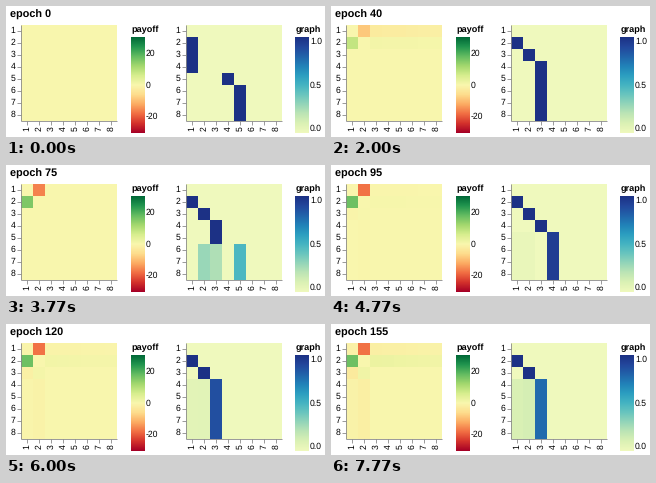
A matplotlib script that plays this animation: 319 px wide and 131 px high, repeating every 8 s.

```python
import numpy as np
import matplotlib.pyplot as plt
from matplotlib.animation import FuncAnimation
from matplotlib.colors import LinearSegmentedColormap

W, H, DPI = 319, 131, 100
FRAMES, STEP_MS, EPOCHS_PER_STEP = 32, 250, 5
N, CELL, TOP = 8, 12, 19
BOTTOM = TOP + N * CELL
BAR_TOP, BAR_HEIGHT, BAR_WIDTH = 31.5, 95.5, 13.3
GREY = "#888888"

plt.rcParams["font.family"] = "Liberation Sans"
plt.rcParams["text.hinting"] = "none"


def colormap(name, codes):
    return LinearSegmentedColormap.from_list(name, ["#" + c for c in codes.split()], N=512)


RED_GREEN = colormap("red_green", "a50026 d4322c f16e43 fcac63 fedd8d f9f7ae "
                                  "d7ee8e a4d86e 64bc61 22964f 006837")
GREEN_BLUE = colormap("green_blue", "eff9bd dbf1b4 bde5b5 94d5b9 69c5be "
                                    "45b4c2 2c9ec0 2182b8 2163aa 23479c 1c3185")


def ramp(epoch, start, end):
    return np.clip((epoch - start) / (end - start), 0, 1)


def pulse(epoch, center, width):
    return max(0, 1 - abs(epoch - center) / width)


def links(columns):
    """One row per player; a fractional column is shared by its two neighbours."""
    return np.maximum(0, 1 - abs(np.arange(1, N + 1) - columns[:, None]))


def stray(m, first_row, column, share):
    """Move a share of the weight in the rows from first_row on to one column."""
    m[first_row - 1:] *= 1 - share
    m[first_row - 1:, column - 1] += share


START = links(np.array([0, 1, 1, 1, 4, 5, 5, 5]))


def graph(epoch):
    # Each player links to the one before, up to a cap that drifts over time
    cap = np.interp(epoch, [10, 30, 40, 75, 85, 95, 115], [1.4, 2, 3, 3, 4, 4, 3])
    m = links(np.minimum(np.arange(N), cap))
    stray(m, 8, 7, 0.9 * pulse(epoch, 60, 15))
    stray(m, 6, 2, 0.55 * pulse(epoch, 75, 15))
    stray(m, 6, 5, 0.48 * pulse(epoch, 75, 15))
    leak = 0.12 * ramp(epoch, 75, 155)
    for column in (1, 2):
        stray(m, int(cap) + 1, column, leak)
    begin = 1 - ramp(epoch, 0, 10)
    return begin * START + (1 - begin) * m


def payoff(epoch):
    growth = ramp(epoch, 0, 82)
    early = pulse(epoch, 40, 20)
    late = ramp(epoch, 80, 155)
    fade = np.linspace(1, 0.6, N - 2)
    m = np.zeros((N, N))
    m[0, 2:] = -(2.8 * early + 1.7 * late) * fade
    m[1, 2:] = (early + 2.3 * late) * fade
    m[2:, 0] = -late
    m[2:, 1] = -1.8 * late
    m[0, 0] = -1.2 * late
    m[2, :2] = -3 * late, 1.5 * late
    m[0, 1], m[1, 0] = -17.5 * growth, 17 * growth
    return m


fig = plt.figure(figsize=(W / DPI, H / DPI), dpi=DPI, facecolor="white")
ax = fig.add_axes([0, 0, 1, 1])


def label(x, y, text, px=8.6, **kw):
    return ax.text(x, y, text, fontsize=px * 72 / DPI, color="black", **kw)


def line(xs, ys):
    ax.plot(xs, ys, color=GREY, lw=0.83 * 72 / DPI, solid_capstyle="butt")


def heatmap(left, cmap, low, high):
    right = left + N * CELL
    image = ax.imshow(np.zeros((N, N)), cmap=cmap, vmin=low, vmax=high, aspect="auto",
                      interpolation="nearest", extent=(left, right, BOTTOM, TOP))
    line([left, left], [TOP, BOTTOM])
    line([left, right], [BOTTOM, BOTTOM])
    for i in range(N):
        mid = (i + 0.5) * CELL
        line([left - 4.2, left], [TOP + mid] * 2)
        line([left + mid] * 2, [BOTTOM, BOTTOM + 4.2])
        label(left - 6, TOP + mid, i + 1, ha="right", va="center")
        label(left + mid, BOTTOM + 5.6, i + 1, ha="center", va="top", rotation=90)
    return image


def color_bar(left, title, cmap, texts, inset):
    bottom = BAR_TOP + BAR_HEIGHT
    ax.imshow(np.linspace(1, 0, 256)[:, None], cmap=cmap, aspect="auto", vmin=0, vmax=1,
              interpolation="bilinear", extent=(left, left + BAR_WIDTH, bottom, BAR_TOP))
    label(left, 25.8, title, 9.1, weight="bold", va="baseline")
    for y, text in zip(np.linspace(BAR_TOP + inset, bottom - inset, len(texts)), texts):
        label(left + 14.8, y, text, va="center")


payoff_map = heatmap(15.2, RED_GREEN, -30, 30)
graph_map = heatmap(180.2, GREEN_BLUE, 0, 1)
color_bar(125.2, "payoff", RED_GREEN, ["20", "0", "-20"], BAR_HEIGHT / 6)
color_bar(289.2, "graph", GREEN_BLUE, ["1.0", "0.5", "0.0"], 4)
title = label(4, 12.2, "", 10.9, weight="bold", va="baseline")

ax.set_xlim(0, W)
ax.set_ylim(H, 0)
ax.axis("off")


def update(frame):
    epoch = frame * EPOCHS_PER_STEP
    payoff_map.set_data(payoff(epoch))
    graph_map.set_data(graph(epoch))
    title.set_text(f"epoch {epoch}")
    return payoff_map, graph_map, title


anim = FuncAnimation(fig, update, frames=FRAMES, interval=STEP_MS, repeat=True, repeat_delay=0)
plt.show()
```
